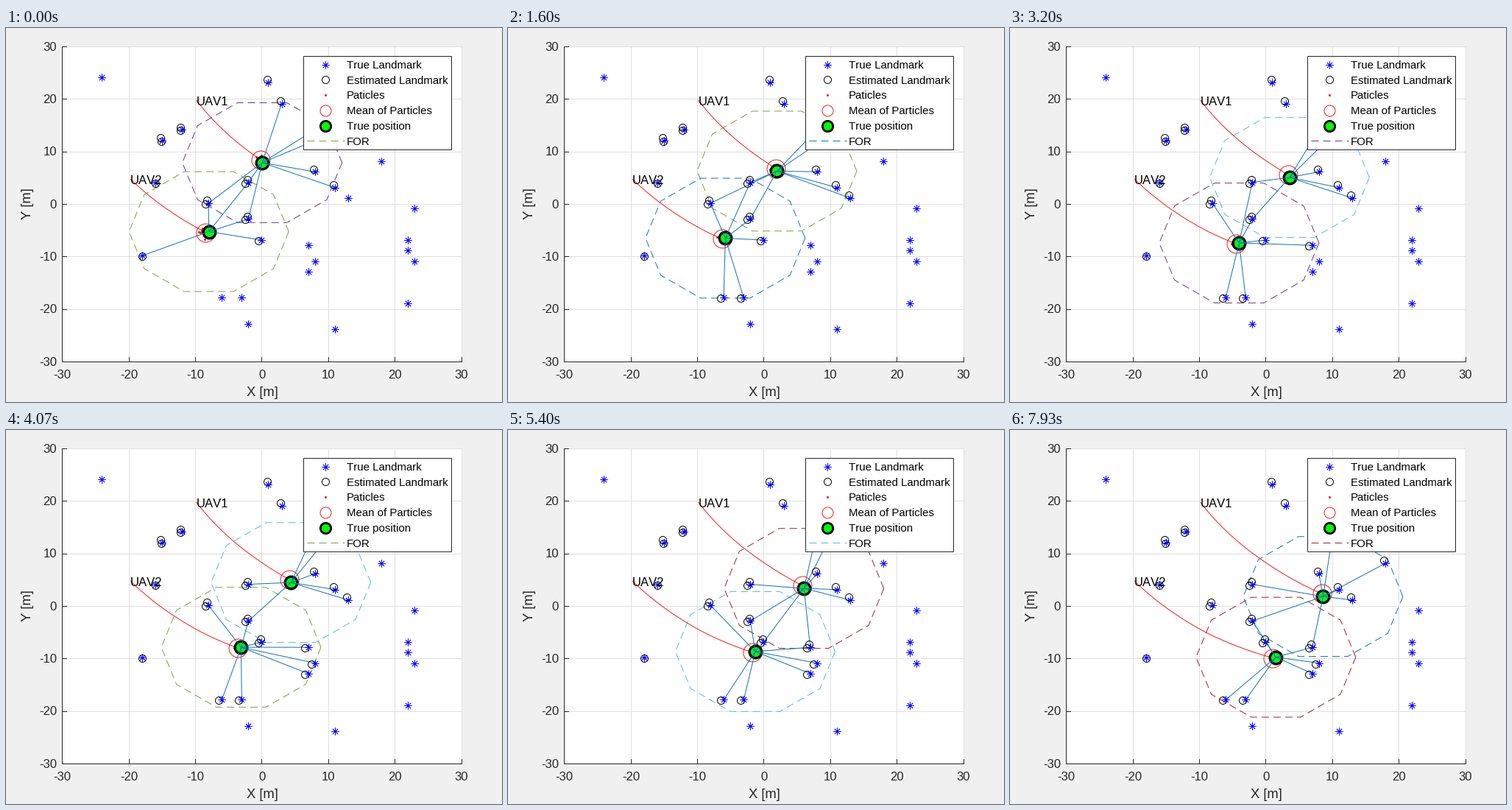
Animation of 674x508 px, one loop 8000 ms. Source, as a matplotlib script:

```python
import numpy as np
import matplotlib.pyplot as plt
from matplotlib.animation import FuncAnimation
from matplotlib.collections import LineCollection
from matplotlib.patches import Rectangle

W, H, DPI = 674, 508, 120
INTERVAL, LOOP = 50, 8000
INK, GRID, RED = "#262626", "#dfdfdf", "#f02020"
ORDER = ["#1474b4", "#c95a26", "#d6a838", "#6f3a7c",
         "#7ca33c", "#58b9e4", "#96243a"]
THIN = .6
DASH = (0, (10, 6))

STEP = .5          # metres flown per step
TURN = .01         # radians turned per step
WARMUP = 31        # steps flown before the loop begins
LINK_RANGE, MAP_RANGE = 12, 12.25

LANDMARKS = np.array([
    (-24, 24), (1, 23), (3, 19), (-15, 12), (-12, 14), (-16, 4), (-2, 4),
    (-8, 0), (-2, -3), (0, -7), (-18, -10), (8, 6), (11, 3), (13, 1),
    (18, 8), (23, -1), (22, -7), (22, -9), (23, -11), (22, -19), (7, -8),
    (8, -11), (7, -13), (-6, -18), (-3, -18), (-2, -23), (11, -24),
    (8, 14), (10, 13)])

plt.rcParams["font.family"] = "Liberation Sans"
plt.rcParams["text.kerning_factor"] = 6


def px(x, y):
    """Metres to stage pixels."""
    return 347.4 + 9.042 * np.asarray(x), 238.1 - 7.133 * np.asarray(y)


def step_at(ms):
    """Steps come evenly, apart from one short stall after the eighth."""
    return int(np.interp(ms, [-204, 2470, 3130, 5400, 7870],
                         [0, 8, 9, 15, 21]))


fig = plt.figure(figsize=(W / DPI, H / DPI), dpi=DPI, facecolor="#f0f0f0")
ax = fig.add_axes([0, 0, 1, 1])
ax.set_xlim(0, W)
ax.set_ylim(H, 0)
ax.axis("off")


def label(x, y, s, size=10, color=INK, **kw):
    ax.text(x, y, s, fontsize=size, color=color, **kw)


def line(xs, ys, color, z, **kw):
    return ax.plot(xs, ys, color=color, lw=THIN, zorder=z, **kw)[0]


def dots(xs, ys, marker, size, edge, z, fill="none", width=THIN):
    return ax.plot(xs, ys, ls="none", marker=marker, ms=size, mec=edge,
                   mfc=fill, mew=width, zorder=z)[0]


def stars(xs, ys, z):
    dots(xs, ys, (8, 2, 0), 6, "blue", z, width=.5)


def draw_axes():
    left, bottom = px(-30, -30)
    right, top = px(30, 30)
    bottom, top = bottom + .8, top + .8
    ax.add_patch(Rectangle((left, top), right - left, bottom - top,
                           fc="white", ec="none", zorder=0))
    for v in range(-30, 31, 10):
        x, y = px(v, v)
        y += .8
        line([x, x], [top, bottom], GRID, 1)
        line([left, right], [y, y], GRID, 1)
        line([x, x], [bottom, bottom - 5.4], INK, 2)
        line([left, left + 5.4], [y, y], INK, 2)
        label(x + .3, 476, str(v), ha="center")
        label(69, y + 5.8, str(v), ha="right")
    line([left, left, right], [top, bottom, bottom], INK, 2)
    label(348, 500, "X [m]", 11, ha="center")
    label(34.5, 239, "Y [m]", 11, ha="center", rotation=90,
          rotation_mode="anchor")


def draw_legend():
    """Returns the dashed sample, whose colour changes."""
    ax.add_patch(Rectangle((404, 38), 201, 127, fc="white", ec=INK,
                           lw=THIN, zorder=20))
    names = ["True Landmark", "Estimated Landmark", "Paticles",
             "Mean of Particles", "True position", "FOR"]
    rows = 49.5 + 20.75 * np.arange(6)
    for y, name in zip(rows, names):
        label(462.7, y + 5.4, name, 9, "black", zorder=21)
    x = 434
    stars(x, rows[0], 21)
    dots(x, rows[1], "o", 6, "black", 21)
    dots(x, rows[2], "o", 1.9, RED, 21, RED, 0)
    dots(x, rows[3], "o", 9, RED, 21)
    dots(x, rows[4], "o", 8.6, "black", 21, "lime", 1.7)
    return line([409, 460], [rows[5], rows[5]], INK, 21, ls=DASH)


class Drone:
    """Flies a circular arc; its estimates are shifted by a pixel drift."""

    def __init__(self, name, x, y, heading, drift, west_drift):
        self.start, self.heading = (x, y), np.radians(heading)
        self.drift, self.west_drift = drift, west_drift
        self.seed = int(name[-1]) * 100
        sx, sy = px(x, y)
        label(sx - .3, sy + 6.5, name, color="black", zorder=12)
        self.view = line([], [], INK, 4, ls=DASH)
        self.trail = line([], [], RED, 5)
        self.swarm = dots([], [], "o", 1.9, RED, 6, RED, 0)
        self.ring = dots([], [], "o", 15, RED, 7)
        self.body = dots([], [], "o", 10, "black", 8, "lime", 2)
        self.found = dots([], [], "o", 6, "black", 10)
        self.links = LineCollection([], colors=ORDER[0], linewidths=THIN,
                                    zorder=9)
        ax.add_collection(self.links, autolim=False)

    def pos(self, n):
        """Place in metres after n steps of flight."""
        a = self.heading + TURN * n
        r = STEP / TURN
        return (self.start[0] + r * (np.sin(a) - np.sin(self.heading)),
                self.start[1] - r * (np.cos(a) - np.cos(self.heading)))

    def distances(self, n):
        x, y = self.pos(np.atleast_1d(n))
        return np.hypot(LANDMARKS[:, :1] - x, LANDMARKS[:, 1:] - y)

    def update(self, k, hue):
        n = k + WARMUP
        x, y = self.pos(n)
        cx, cy = px(x, y)
        dx, dy = self.drift
        self.body.set_data([cx], [cy])
        self.ring.set_data([cx + dx], [cy + dy])

        past = np.linspace(0, n, 60)
        grown = np.minimum(past / WARMUP, 1)
        tx, ty = px(*self.pos(past))
        self.trail.set_data(tx + dx * grown, ty + dy * grown)

        a = np.radians(np.arange(0, 361, 36))
        self.view.set_data(*px(x + 12 * np.cos(a), y + 12 * np.sin(a)))
        self.view.set_color(hue)

        spread = 3 - .12 * k
        cloud = np.random.default_rng(self.seed + k).normal(0, spread, (2, 14))
        self.swarm.set_data(cx + dx - spread + cloud[0], cy + dy + cloud[1])

        near = self.distances(n + .5)[:, 0] < LINK_RANGE
        ends = np.column_stack(px(*LANDMARKS[near].T))
        self.links.set_segments([[(cx, cy), tuple(e)] for e in ends])

        known = self.distances(np.arange(n + 1)).min(axis=1) < MAP_RANGE
        lx, ly = LANDMARKS[known].T
        ex, ey = px(lx, ly)
        shift = np.interp(lx, [-16, -8], [self.west_drift, dx])
        self.found.set_data(ex + shift, ey + dy)


draw_axes()
legend_view = draw_legend()
stars(*px(*LANDMARKS.T), 11)

drones = [Drone("UAV1", -9.8, 19.6, -59.1, (-1.7, -3.7), -2),
          Drone("UAV2", -19.7, 4.6, -49.2, (-4.3, 1), 0)]


def draw(i):
    k = step_at(i * INTERVAL + INTERVAL / 2)
    first = 3 + int(k / 4.3)
    second = first + min(6, 1 + int(k / 2.2))
    for drone, hue in zip(drones, (first, second)):
        drone.update(k, ORDER[hue % 7])
    legend_view.set_color(ORDER[second % 7])
    return []


anim = FuncAnimation(fig, draw, frames=LOOP // INTERVAL, interval=INTERVAL,
                     init_func=lambda: draw(0), repeat=True, repeat_delay=0,
                     blit=False)
plt.show()
```
